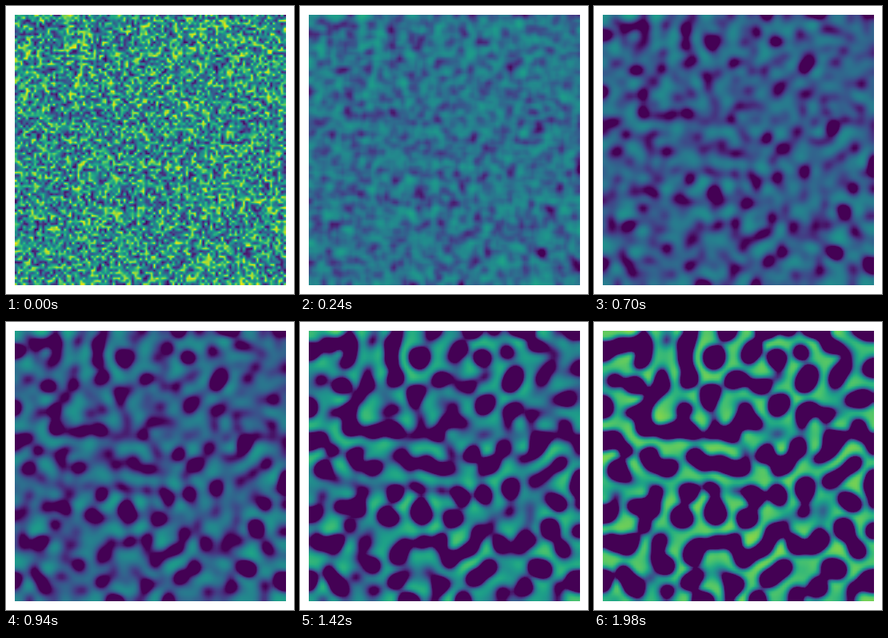
These frames come from a looping animation (360 by 360 pixels, 2000 ms). A matplotlib script:

```python
"""Turing patterns growing out of noise (FitzHugh-Nagumo reaction-diffusion)."""
import numpy as np
import matplotlib.pyplot as plt
from matplotlib.animation import FuncAnimation

SIZE = 100
FRAMES = 100
STEPS_PER_FRAME = 100
DX = 2.0 / SIZE
DT = 0.001
A, B, TAU, K = 2.8e-4, 5e-3, 0.1, -0.005


def fill_edges(Z):
    """Copy the outer cells into the border, so nothing flows out."""
    Z[0], Z[-1] = Z[1], Z[-2]
    Z[:, 0], Z[:, -1] = Z[:, 1], Z[:, -2]


def laplacian(Z):
    return (Z[:-2, 1:-1] + Z[2:, 1:-1] + Z[1:-1, :-2] + Z[1:-1, 2:]
            - 4 * Z[1:-1, 1:-1]) / DX**2


def simulate():
    np.random.seed(0)
    U = np.pad(np.random.rand(SIZE, SIZE), 1, mode="edge")
    V = np.pad(np.random.rand(SIZE, SIZE), 1, mode="edge")
    u, v = U[1:-1, 1:-1], V[1:-1, 1:-1]
    history = [u.copy()]
    for _ in range(FRAMES - 1):
        for _ in range(STEPS_PER_FRAME):
            du = A * laplacian(U) + u - u * u * u - v + K
            dv = (B * laplacian(V) + u - v) / TAU
            u += DT * du
            v += DT * dv
            fill_edges(U)
            fill_edges(V)
        history.append(u.copy())
    return history


history = simulate()

fig = plt.figure(figsize=(5, 5), dpi=72, facecolor="white")
ax = fig.add_axes([0.03, 0.03, 0.94, 0.94])
ax.axis("off")
image = ax.imshow(history[0], cmap="viridis", vmin=0, vmax=1,
                  interpolation="bilinear", extent=[-1, 1, -1, 1])


def update(frame):
    image.set_data(history[frame])
    return [image]


anim = FuncAnimation(fig, update, frames=FRAMES, interval=20,
                     repeat=True, repeat_delay=0)
plt.show()
```
